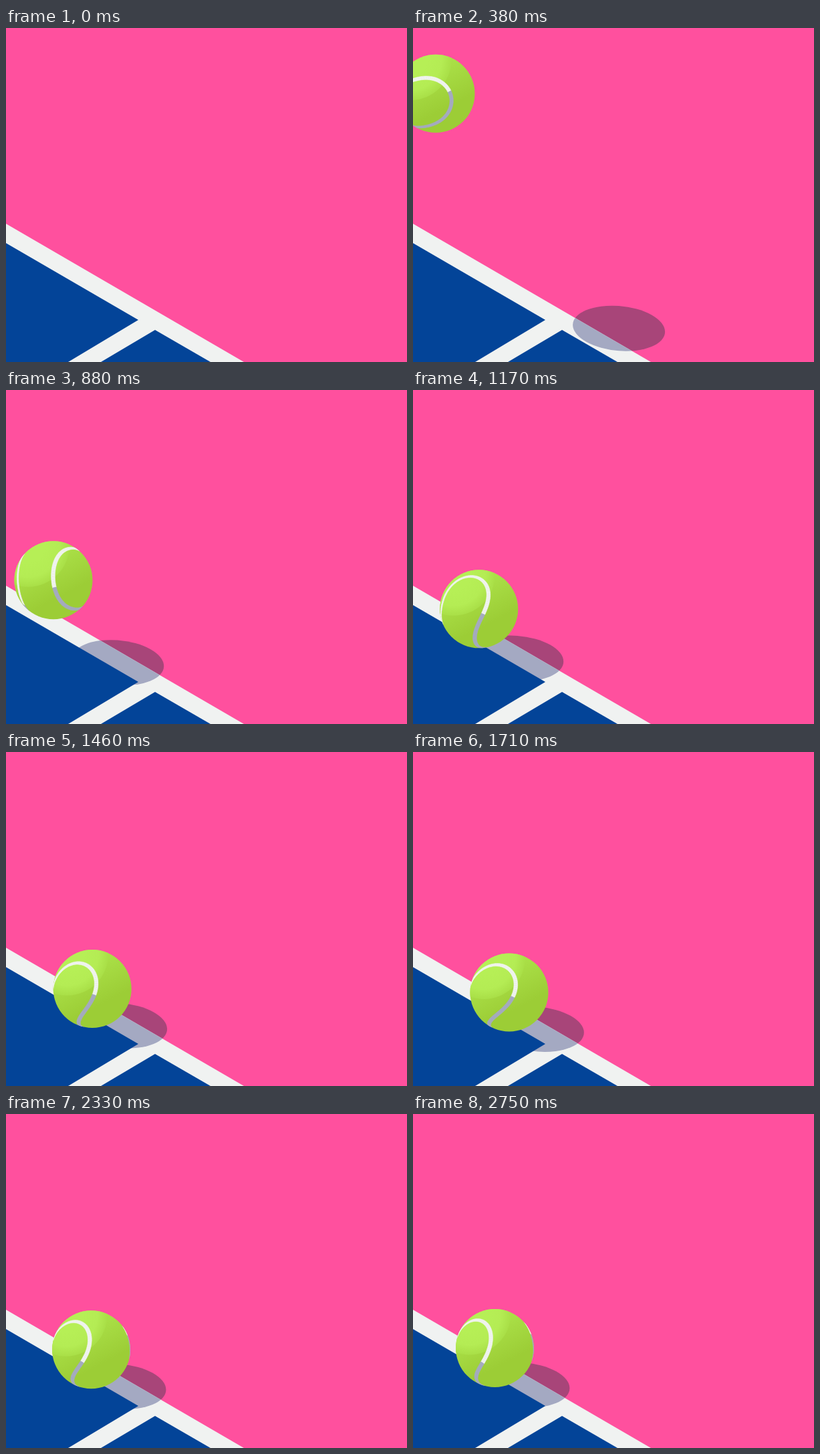
Animation, 600 px wide and 500 px high, one loop 4000 ms. Source, as an HTML page with a canvas:

```html
<!DOCTYPE html>
<html>
<head>
<meta charset="utf-8">
<title>Tennis ball</title>
<style>
html, body { margin: 0; width: 100%; height: 100%; overflow: hidden; background: #ff509e; }
canvas { display: block; }
</style>
</head>
<body>
<canvas id="stage" width="600" height="500"></canvas>
<script>
const ctx = document.getElementById('stage').getContext('2d');
const LOOP = 4000, START = 170, TURN = 1710, END = 2750, FPS = 24;
const R = 58.5, REST = 55, GRAVITY = 0.00202;
const PINK = '#ff509e', LINE = '#f0f2f1', BLUE = '#034498';
const PINK_SHADE = '#a84579', LINE_SHADE = '#a4a9c2';

// time, x, depth on the court
const path = [
  [START, -22, 409], [561, 57.5, 413], [985, 75.5, 394.6],
  [1220, 105, 400.3], [1460, 129, 409.5]
];
// each flight lifts off and lands at these times
const flights = [[-425, 561], [561, 985], [985, 1220], [1220, 1350], [1350, 1420]];

const lerp = (a, b, u) => a + (b - a) * u;

function slerp(a, b, u) {
  const dot = a.reduce((sum, v, i) => sum + v * b[i], 0);
  const w = Math.acos(Math.min(1, dot));
  const q = a.map((v, i) => (v * Math.sin((1 - u) * w) + b[i] * Math.sin(u * w)) / Math.sin(w));
  const len = Math.hypot(...q);
  return q.map(v => v / len);
}

// orientations as quaternions w, x, y, z
const rollBack = [0.463, -0.707, -0.532, -0.052];
const rollAhead = [0.475, -0.699, -0.532, 0.046];
const roll = x => slerp(rollBack, rollAhead, (x - 122.5) / 13.5);
const spins = [
  [540, [0.598, 0.349, -0.659, -0.294]],
  [880, [0.959, 0.019, -0.282, -0.026]],
  [1170, [0.663, -0.663, -0.348, -0.026]],
  [1460, [0.493, -0.735, -0.464, 0.031]],
  [TURN, roll(144)]
];

// the key that starts the span around t, and how far t is through it
function span(keys, t) {
  let i = 0;
  while (i < keys.length - 2 && t >= keys[i + 1][0]) i++;
  return [i, (t - keys[i][0]) / (keys[i + 1][0] - keys[i][0])];
}

function place(t) {
  if (t >= TURN) {
    const u = 1 - Math.pow(1 - Math.min(1, (t - TURN) / (END - TURN)), 1.75);
    return [lerp(144, 122.5, u), lerp(415, 405.5, u)];
  }
  if (t >= 1460) {
    const u = 1 - ((TURN - t) / 250) ** 2;
    return [lerp(129, 144, u), lerp(409.5, 415, u)];
  }
  const [i, u] = span(path, t);
  const [, x0, d0] = path[i], [, x1, d1] = path[i + 1];
  return [lerp(x0, x1, i ? u : 1 - Math.pow(1 - u, 1.6)), lerp(d0, d1, u)];
}

function spin(t, x) {
  if (t >= TURN) return roll(x);
  const [i, u] = span(spins, t);
  return slerp(spins[i][1], spins[i + 1][1], u);
}

function poly(color, ...pts) {
  ctx.fillStyle = color;
  ctx.beginPath();
  pts.forEach(p => ctx.lineTo(...p));
  ctx.fill();
}

function disc(x, y, r, fill) {
  ctx.fillStyle = fill;
  ctx.beginPath();
  ctx.arc(x, y, r, 0, 7);
  ctx.fill();
}

function shadow(color, pos) {
  if (!pos) return;
  ctx.save();
  ctx.transform(69, 5.1, 0, 33.6, ...pos);
  disc(0, 0, 1, color);
  ctx.restore();
}

function court(pos) {
  ctx.fillStyle = PINK;
  ctx.fillRect(0, 0, 600, 500);
  shadow(PINK_SHADE, pos);
  poly(LINE, [0, 293], [356, 500], [0, 500]);
  ctx.save();
  ctx.clip();
  shadow(LINE_SHADE, pos);
  ctx.restore();
  poly(BLUE, [0, 322], [198, 437], [93, 500], [0, 500]);
  poly(BLUE, [223, 452], [306, 500], [142, 500]);
}

function axes([w, x, y, z]) {
  return [
    [1 - 2 * (y * y + z * z), 2 * (x * y + w * z), 2 * (x * z - w * y)],
    [2 * (x * y - w * z), 1 - 2 * (x * x + z * z), 2 * (y * z + w * x)],
    [2 * (x * z + w * y), 2 * (y * z - w * x), 1 - 2 * (x * x + y * y)]
  ];
}

function seam(q) {
  const [eu, ev, ew] = axes(q), steps = 180, half = 0.049;
  const point = k => {
    const a = k / steps * 2 * Math.PI, c = Math.cos(a), s = Math.sin(a);
    const u = (c ** 3 + s ** 3) / Math.SQRT2;
    const v = (s ** 3 - c ** 3) / Math.SQRT2 * 1.25;
    const w = 1.56 * s * c;
    const len = Math.hypot(u, v, w);
    return eu.map((e, i) => (u * e + v * ev[i] + w * ew[i]) / len);
  };
  const edges = k => {
    const p = point(k), a = point(k - 0.5), b = point(k + 0.5);
    const d = b.map((v, i) => v - a[i]);
    const n = [p[1] * d[2] - p[2] * d[1], p[2] * d[0] - p[0] * d[2]];
    const m = half / Math.hypot(...d);
    return [1, -1].map(g => [R * (p[0] + g * m * n[0]), R * (p[1] + g * m * n[1])]);
  };
  for (let k = 0; k < steps; k++) {
    const [x, y, z] = point(k + 0.5);
    if (z < 0) continue;
    const [a, b] = edges(k), [c, d] = edges(k + 1);
    const color = 0.6 * x + y > 0.18 ? LINE_SHADE : LINE;
    poly(color, a, b, d, c);
    ctx.strokeStyle = color;
    ctx.lineWidth = 0.5;
    ctx.closePath();
    ctx.stroke();
  }
}

function ball(x, y, q) {
  ctx.save();
  ctx.translate(x, y);
  const body = ctx.createLinearGradient(-25, -55, 15, 22);
  body.addColorStop(0, '#b0e84f');
  body.addColorStop(1, '#9ccd36');
  disc(0, 0, R, body);
  ctx.clip();
  const glow = ctx.createRadialGradient(-38, -52, 25, -38, -52, 62);
  glow.addColorStop(0, '#b6ef56');
  glow.addColorStop(0.6, '#b4ec54');
  glow.addColorStop(1, '#a9df47');
  disc(-38, -52, 62, glow);
  seam(q);
  ctx.restore();
}

function draw(now) {
  const time = now % LOOP;
  if (time < START) return court();
  const frame = Math.floor((Math.min(time, END) - START + 5) * FPS / 1000 + 0.001);
  const t = START + frame * 1000 / FPS;
  const [x, depth] = place(t);
  const lift = Math.max(0, ...flights.map(([a, b]) => GRAVITY * (t - a) * (b - t)));
  const reach = REST + lift, shadowY = depth + 0.13 * lift;
  court([x + 0.78 * reach, shadowY]);
  ball(x, shadowY - reach, spin(t, x));
}

let begin;
function tick(now) {
  begin ??= now;
  draw(now - begin);
  requestAnimationFrame(tick);
}
requestAnimationFrame(tick);
</script>
</body>
</html>
```
